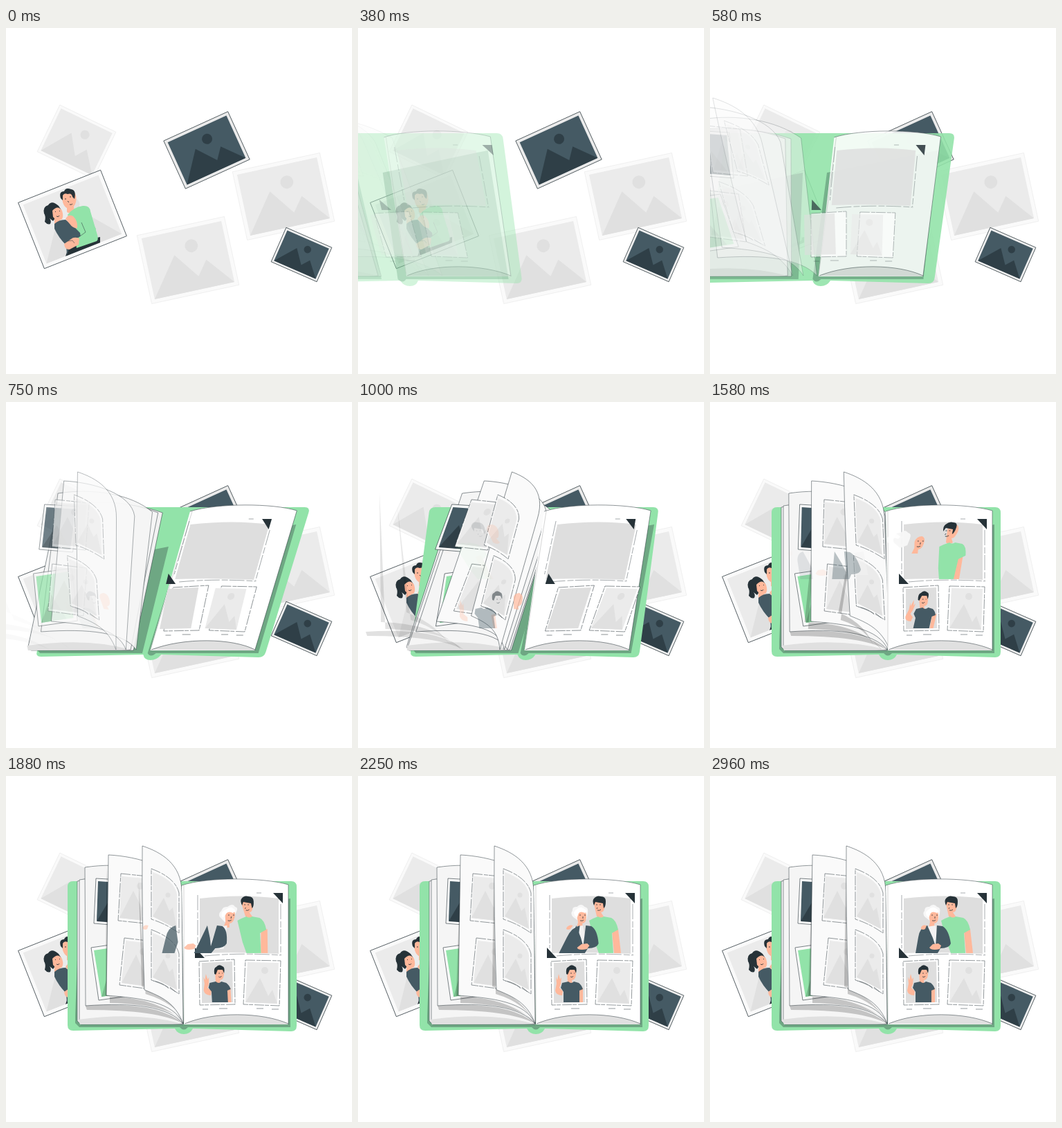
An HTML page for the animation above (3000 ms loop, 500x500 px).

```html
<!DOCTYPE html>
<html lang="en">
<head>
<meta charset="utf-8">
<title>Photo album</title>
<style>
  html, body { margin: 0; width: 100%; height: 100%; overflow: hidden; background: #fff; }
  svg { display: block; width: 100vw; height: 100vh; }
</style>
</head>
<body>
<svg id="stage" viewBox="0 0 500 500"></svg>
<script>
const LOOP = 3000, DURATION = 1400;
const GREEN = '#92e3a9', DEEP_GREEN = '#6ea783', INK = '#263238', SLATE = '#455a64', SKIN = '#ffb89b';
const WIDE = 318, MEDIUM = 225, NEAR = 200;

const shape = (d, fill, extra = '') => `<path d="${d}" fill="${fill}" ${extra}/>`;
const line = (d, width = 0.6) => shape(d, 'none', `stroke="${INK}" stroke-width="${width}"`);
const dashed = d => shape(d, 'none', `stroke="${INK}" stroke-width=".5" stroke-dasharray="14 2 6 1"`);
const oval = (x, y, rx, ry, fill) => `<ellipse cx="${x}" cy="${y}" rx="${rx}" ry="${ry}" fill="${fill}"/>`;

// Placeholder landscape, in a box of half size hw by hh around the middle.
function landscape(hw, hh, sky, hill) {
  const at = (x, y) => `${x * hw} ${y * hh}`;
  return `<rect x="${-hw}" y="${-hh}" width="${2 * hw}" height="${2 * hh}" fill="${sky}"/>` +
    shape(`M${at(-1, 1)}L${at(-0.3, -0.25)}L${at(0.17, 0.58)}L${at(0.44, 0.11)}L${at(1, 1)}Z`, hill) +
    oval(0.155 * hw, -0.43 * hh, hw * 0.16, hw * 0.16, hill);
}

function print(x, y, w, h, angle, dark, frame, edge) {
  const pad = w * 0.043;
  const colors = dark ? [SLATE, '#2f3f47'] : ['#ebebeb', '#e0e0e0'];
  return `<g transform="translate(${x} ${y}) rotate(${angle})">
    <rect x="${-w / 2}" y="${-h / 2}" width="${w}" height="${h}" fill="${frame}" stroke="${edge}" stroke-width=".7"/>
    ${landscape(w / 2 - pad, h / 2 - pad, ...colors)}</g>`;
}

const faint = (x, y, w, h, angle) => print(x, y, w, h, angle, false, '#fafafa', '#ebebeb');

const couple = `<clipPath id="inner"><rect x="-58.5" y="-46" width="117" height="92"
    transform="translate(96 276.5) rotate(-21.6)"/></clipPath><g clip-path="url(#inner)">` +
  shape('M86 330L92 312L136 302V318Z', INK) +
  shape('M88 257L97 253L99 264Q94 270 88 266Z', SKIN) +
  shape('M89 270Q97 259 111 257Q121 256 122 265L132 299Q134 306 131 308L102 318L97 290Z', GREEN) +
  oval(91.5, 247, 10, 14, SKIN) +
  shape('M79 246Q76 236 84 236Q86 230 94 233Q102 234 99 247L96 244Q95 238 89 240Q84 238 82 242V249Z', INK) +
  shape('M76 257Q66 248 61 256Q53 258 55 268Q58 272 56 280Q60 285 64 283Q66 279 63 275L68 279L80 263Z', INK) +
  shape('M67 264Q75 255 81 264Q84 273 80 277Q73 279 68 273Z', SKIN) +
  shape('M70 272L77 276L79 282L70 283Z', SKIN) +
  shape('M70 283Q76 277 86 277Q97 285 107 296L108 303L95 308L88 328L87 314Q76 303 70 290Z', SLATE) +
  shape('M86 276Q90 268 97 272Q104 279 103 289Q97 290 92 283Z', SKIN) +
  shape('M130 290Q129 302 117 307L104 312L102 304L115 296L122 277', GREEN) +
  shape('M106 304Q98 301 94 305L84 312Q85 321 92 320L105 313Z', SKIN) +
  line('M89 308L96 307L99 311M109 281L115 295L104 303', 0.5) +
  line('M85 247l2 0M92 244l2 0M89 250l2 2M92 255q3 1 4-1M71 265l1 1M77 264l1 1M73 272q3 2 4-1', 0.9) + '</g>';

const backdrop = faint(102, 164.5, 90, 75, 25.8) +
  faint(401, 243.5, 129, 101, -12.2) +
  faint(263, 335.5, 129, 101, -12.2) +
  print(290, 176.5, 102, 76, -24.5, true, '#ebebeb', INK) +
  print(427, 327.5, 72, 54, 23.7, true, '#f0f0f0', INK) +
  print(96, 276.5, 128, 102.5, -21.6, false, '#fafafa', INK) + couple;

const parts = [];
const part = (start, reach, markup) => parts.push({ start, reach, markup });

// Cover and the shade inside it
part(25, WIDE,
  shape('M97 152H412Q420 152 420 160V361Q420 369 412 369L270 365Q266 373 257 373Q248 373 244 365L97 368Q89 368 89 360V160Q89 152 97 152Z', GREEN));
part(45, WIDE, shape('M254 209L395 180L411 177V363H263Q257 370 251 363Z', DEEP_GREEN));
part(100, WIDE, shape('M104 240L254 209V363H106L100 357V346Z', DEEP_GREEN));

// Left pages
const page = (d, fill) => shape(d, fill, `stroke="${INK}" stroke-width=".5"`);
const shadow = d => shape(d, '#000', 'opacity=".2"');

part(125, WIDE, page('M103 152Q190 138 254 160L256 359H108L103 354Z', '#f2f2f2'));
part(135, WIDE,
  page('M106 150Q190 136 253 160L255 358L106 353Z', '#f5f5f5') +
  shape('M104 352Q190 340 255 358L107 359Z', '#e0e0e0'));

part(205, 195, page('M114 132C165 124 220 133 254 159L256 358C235 333 185 327 115 332Z', '#f5f5f5'));
part(245, MEDIUM,
  shape('M130 148L180 151L176 217L127 213Z', '#fafafa') + line('M130 148L180 151L176 217L127 213Z') +
  shape('M133 152L176 155L172 213L131 209Z', SLATE) + shape('M131 210L150 178L172 213Z', '#2f3f47'));
part(265, MEDIUM,
  shape('M123 248L178 240L190 316L134 324Z', '#fafafa') + line('M123 248L178 240L190 316L134 324Z') +
  shape('M127 252L174 245L184 312L138 319Z', GREEN) + shape('M138 319L150 278L174 313Z', '#78bd8c'));
part(560, MEDIUM, shadow('M115 332Q220 325 256 358Q220 338 117 338Z'));
part(580, MEDIUM, shadow('M148 130L142 318Q222 320 256 358Q238 330 148 328Z'));

const flatFrame = (outer, inner, hill, x, y, r) =>
  shape(outer, '#fafafa') + dashed(outer) + shape(inner, '#ebebeb') + shape(hill, '#e0e0e0') + oval(x, y, r, r, '#e0e0e0');
part(245, 215, page('M148 114C190 116 247 132 254 165L256 358C242 326 195 321 145 317Z', '#fafafa'));
part(290, MEDIUM, flatFrame('M166 141L215 146L211 214L162 209Z', 'M167 145L211 149L208 210L164 205Z',
  'M164 205L184 166L196 190L203 181L208 210Z', 194, 159, 5));
part(310, MEDIUM, flatFrame('M171 234L221 240L215 309L164 302Z', 'M173 238L217 243L212 305L167 299Z',
  'M167 299L188 258L200 285L207 276L212 305Z', 198, 254, 5));
part(620, MEDIUM, shadow('M196 150L194 304Q238 321 256 358Q242 328 199 315Z'));
part(290, MEDIUM, page('M197 101C224 110 254 127 254 168L256 358C245 328 225 319 200 309Q196 200 197 101Z', '#fafafa'));
const leaf = dy => `<g transform="translate(0 ${dy})">` +
  flatFrame('M210 134Q245 147 250 169L250 227Q230 213 210 207Z', 'M212 139Q243 150 247 171V221Q231 208 212 203Z',
    'M212 203L228 176L236 195L241 190L247 221Z', 234, 172, 3.5) + '</g>';
part(325, MEDIUM, leaf(0));
part(345, MEDIUM, leaf(88) + line('M213 296q15 3 22 11M237 305l8 7', 0.5));

// Right page
part(35, WIDE,
  shape('M254 158C290 146 370 146 408 157V359H257Z', '#fff') +
  shape('M258 358C300 340 370 341 408 358V359Z', '#e0e0e0') +
  line('M254 158C290 146 370 146 408 157V359M258 358C300 340 370 341 408 358', 0.5) +
  shape('M257 158V355', 'none', 'stroke="#bbb" stroke-width=".6"'));
part(60, WIDE,
  shape('M280 177Q340 170 394 177V257Q335 254 280 256Z', '#dedede') +
  shape('M277 172V249M287 260Q340 255 398 259M397 185V258M362 169h7', 'none',
    `stroke="${INK}" stroke-width=".4" stroke-dasharray="22 3 9 2"`));
part(40, WIDE, shape('M386 169H400V184Z', INK));
part(105, WIDE, shape('M273 248V263H287Z', INK));
part(118, WIDE, shape('M279 268L330 265L331 330L280 331Z', '#fff') + dashed('M279 268L330 265L331 330L280 331Z') +
  line('M284 337h8M308 336h12', 0.5));
part(140, WIDE, shape('M283 270L327 268L328 327L283 328Z', '#dedede'));
part(112, WIDE, shape('M346 266L397 267L395 332L343 330Z', '#fff') + dashed('M346 266L397 267L395 332L343 330Z') +
  line('M362 336h10M384 337h10', 0.5));
part(135, WIDE, shape('M349 269L394 270L392 329L346 327Z', '#ebebeb') +
  shape('M346 327L367 292L379 318L385 309L392 329Z', '#e0e0e0') + oval(374, 281, 5, 5, '#e0e0e0'));

// Waving boy
part(520, NEAR, shape('M302 282Q303 276 310 276Q316 278 315 287Q314 295 309 295L310 300L303 299Z', SKIN));
part(600, NEAR, shape('M301 286Q300 277 304 276Q308 271 313 275Q317 276 315 285L313 280L306 280L303 287Z', INK) +
  line('M307 285h2M312 285h1M307 290q3 2 4-1', 0.8));
part(650, NEAR, shape('M319 308L325 306V327H320Z', SKIN));
part(645, NEAR, shape('M295 299L304 297Q308 301 312 297L319 299Q323 302 325 308L320 310V327H297L297 312L293 306Z', SLATE));
part(690, NEAR, shape('M286 290L288 295L290 286L292 294L294 291L293 301L291 306L296 311L295 317Q286 317 285 310L287 300Z', SKIN));

// Young man
part(730, NEAR, shape('M341 185Q341 177 350 177Q357 178 357 187Q356 197 351 197L355 203Q351 207 345 203Z', SKIN));
part(805, NEAR, shape('M341 187Q338 180 341 177Q345 172 351 174Q358 174 358 181Q358 189 355 191L354 184Q348 183 343 182Z', INK) +
  line('M344 186h2M349 186h2M346 190l-1 2M346 194q3 1 5-1', 0.8));
part(890, NEAR, shape('M367 224L376 221L380 256H370Z', SKIN));
part(855, NEAR, shape('M334 209Q341 205 347 203Q351 206 355 203L366 205Q373 208 376 222L367 227L369 256H348L342 240Z', GREEN));

// Grandmother
part(1000, NEAR, shape('M311 204Q306 199 310 195Q310 188 317 189Q323 183 328 189Q334 190 332 198L330 207L320 211Z', '#f7f7f7'));
part(920, NEAR, shape('M316 202Q317 194 325 194Q331 196 330 205Q329 213 324 213L325 219H316L318 211Z', SKIN) +
  line('M320 201h2M327 201h2M325 203v3M321 209q4 1 5-1', 0.8));
part(1040, NEAR, shape('M313 202Q310 196 316 193Q322 186 331 195L328 198Q322 195 319 198L316 205Z', '#fff'));
part(1170, NEAR, shape('M313 218L326 216L331 250H308Z', '#f2f2f2'));
part(1245, NEAR, shape('M314 216L322 234L326 246L328 216L336 217Q345 222 348 242Q346 249 333 249L329 256H304Z', SLATE));
part(1380, NEAR, shape('M314 216Q303 219 301 233L297 256H315L319 240Z', SLATE));
part(1350, NEAR, shape('M317 248L322 243L330 242L334 245L332 250Q324 252 319 250Z', SKIN));
part(1480, NEAR, shape('M305 219Q307 214 313 216L311 221Q308 223 305 221Z', SKIN));

const stage = document.getElementById('stage');
stage.innerHTML = backdrop + parts.map(p => `<g class="part">${p.markup}</g>`).join('');
stage.querySelectorAll('.part').forEach((el, i) => {
  const box = el.getBBox();
  Object.assign(parts[i], { el, middle: box.y + box.height / 2 });
});

const mix = (a, b, k) => a + (b - a) * k;
const ease = x => 0.5 - 0.5 * Math.cos(Math.PI * x);

// Slide in from the left while leaning, then swing back upright.
function pose(age) {
  const x = Math.min(1, Math.max(0, age / DURATION));
  if (x < 0.6) {
    const k = ease(x / 0.6);
    return { lean: mix(24, -19, k), away: 1 - k, opacity: Math.min(1, k * (0.9 + 0.4 * k)) };
  }
  const lean = x < 0.8 ? mix(-19, 5, ease((x - 0.6) / 0.2)) : mix(5, 0, ease((x - 0.8) / 0.2));
  return { lean, away: 0, opacity: 1 };
}

function draw(time) {
  for (const { el, start, reach, middle } of parts) {
    const { lean, away, opacity } = pose(time - start);
    const slope = Math.tan(lean * Math.PI / 180);
    el.setAttribute('transform', `matrix(1 0 ${slope} 1 ${-reach * away - slope * middle} 0)`);
    el.setAttribute('opacity', opacity);
  }
}

const begin = performance.now();
function tick() {
  draw((performance.now() - begin) % LOOP);
  requestAnimationFrame(tick);
}
tick();
</script>
</body>
</html>
```
